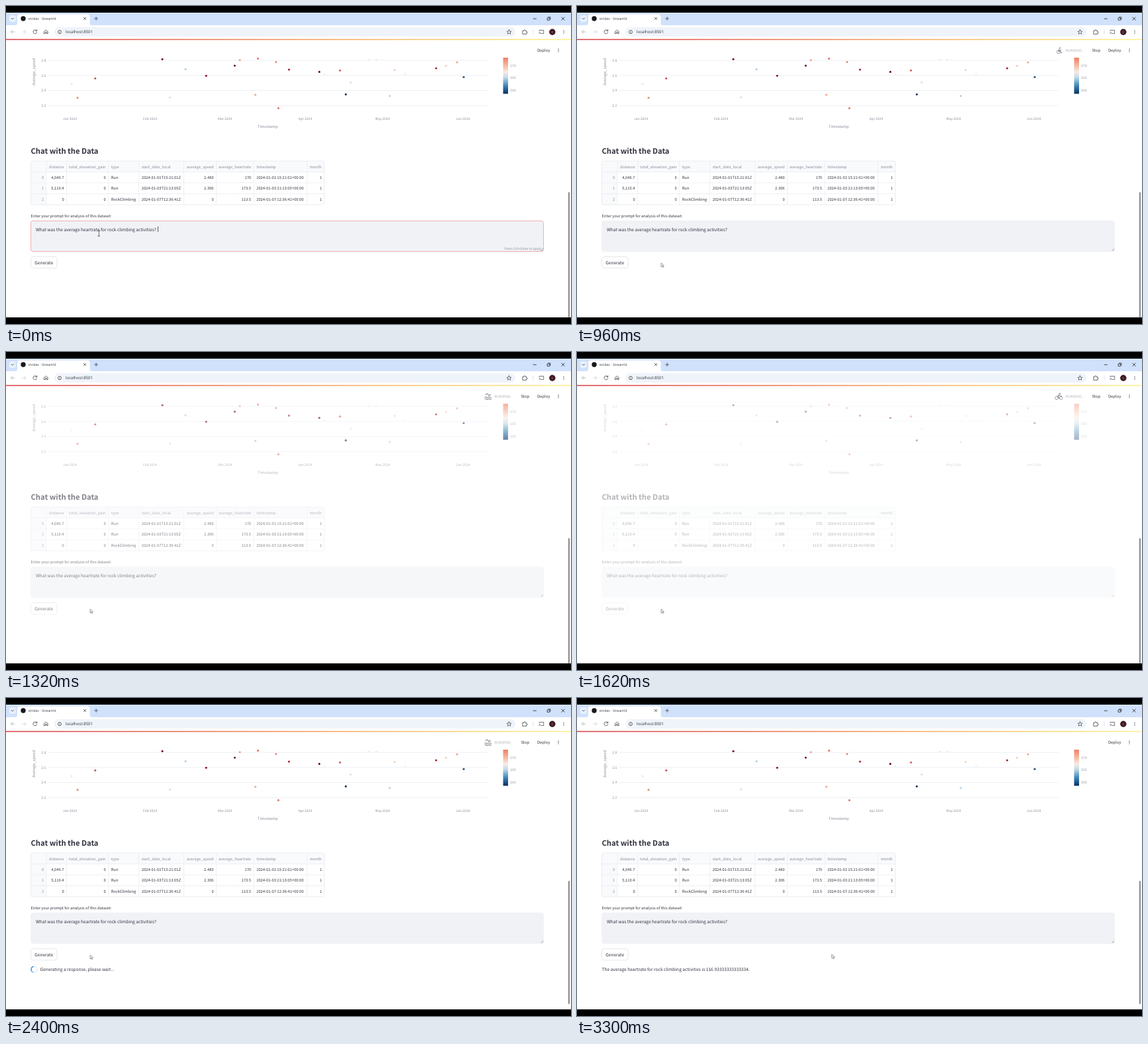
An HTML page for the animation above (3.36 s loop, 853 by 480 pixels).

```html
<!DOCTYPE html>
<html lang="en">
<head>
<meta charset="utf-8">
<title>strides</title>
<style>
html, body { margin: 0; width: 100%; height: 100%; overflow: hidden; background: #000; }
svg { display: block; width: 100vw; height: 100vh; }
text { font-family: "Noto Sans CJK JP", "Noto Sans CJK SC", "Noto Sans CJK", "Noto Sans", sans-serif; text-rendering: geometricPrecision; white-space: pre; }
.ui { font-family: "Open Sans", "Noto Sans", sans-serif; }
.line { fill: none; stroke-linecap: round; stroke-linejoin: round; }
</style>
</head>
<body>
<svg id="stage" viewBox="0 0 853 480"></svg>
<script>
const INK = '#31333f', GREY = '#8a8d99', LOOP = 3360, STEP = 60;

// y is the middle of the capitals
const text = (s, x, y, size, fill = INK, more = '') =>
  `<text x="${x}" y="${y + size * .36}" font-size="${size}" fill="${fill}" ${more}>${s}</text>`;
const END = 'text-anchor="end"', MID = 'text-anchor="middle"', UI = 'class="ui"';
const rect = (x, y, w, h, fill, more = '') =>
  `<rect x="${x}" y="${y}" width="${w}" height="${h}" fill="${fill}" ${more}/>`;
const dot = (x, y, r, fill, more = '') => `<circle cx="${x}" cy="${y}" r="${r}" fill="${fill}" ${more}/>`;
const line = (d, stroke = '#3c4043', w = .8, more = '') =>
  `<path class="line" d="${d}" stroke="${stroke}" stroke-width="${w}" ${more}/>`;
const group = (id, body) => `<g id="${id}">${body}</g>`;
const dots = (x, y, gap, r) => [-gap, 0, gap].map(d => dot(x, y + d, r, '#45474f')).join('');

function gradient(id, axis, stops) {
  const s = stops.map(([o, c]) => `<stop offset="${o}" stop-color="${c}"/>`).join('');
  return `<linearGradient id="${id}" x1="0" y1="0" ${axis}="1" ${axis === 'x2' ? 'y2' : 'x2'}="0">${s}</linearGradient>`;
}

function browser() {
  return rect(0, 10, 853, 460, '#fff') + rect(0, 10, 853, 19, '#d0e1fc') +
    rect(5, 14, 9.5, 10, '#e9f1fe', 'rx="3"') + line('M8 18.3l1.8 1.8 1.8-1.8') +
    '<path d="M14 29q3 0 3-3V16q0-3.5 3.500-3.500H123q3.500 0 3.500 3.500V26q0 3 3 3Z" fill="#fff"/>' +
    dot(26, 19, 3.7, '#17191f') + text('strides · Streamlit', 33.5, 19.3, 5.2, '#3a3c42', UI) +
    line('M117.300 17.200l3.400 3.400m0-3.400l-3.400 3.400M133.700 19h4.800M136.100 16.600v4.800') +
    line('M796 19.200h4.500M838.800 16.900l4.400 4.400m0-4.400l-4.400 4.400M817.500 18h3.200v3.300h-3.200zM818.500 16.800h3.300v3.400', '#222') +
    line('M13 39H7.500m2.500-2.500L7.500 39l2.500 2.500', '#a9adb3') +
    line('M24.500 39H30m-2.500-2.500L30 39l-2.500 2.500', '#cdd0d5') +
    line('M46.300 37.200a2.900 2.900 0 1 0 .4 2.600M46.700 35.800v1.900h-1.900') +
    line('M57.700 38.500l2.700-2.200 2.700 2.200v3.200h-1.800v-2.200h-1.800v2.200h-1.800z') +
    rect(73, 32, 696, 14, '#eff4fb', 'rx="7"') + dot(81, 39.2, 4.8, '#fff') +
    dot(81, 39.2, 2.7, 'none', 'stroke="#3c4043" stroke-width=".8"') +
    line('M81 39v1.500M81 37.700v.1') + text('localhost:8501', 90, 39.3, 6.1, '#2c2f34', UI) +
    line('M759.500 35.800l1 2.300 2.500.2-1.900 1.600.6 2.400-2.200-1.300-2.200 1.300.6-2.400-1.900-1.600 2.500-.2z', '#3c4043', .7) +
    line('M780.300 37.300h1.700q0-1.500 1-1.500t1 1.500h1.700v1.600q1.500 0 1.500 1t-1.500 1v1.500h-5.400z') +
    line('M796 36v6', '#c9dafa') + line('M805 37.500v-1h6.700v5h-3.200M805 39.500q2 0 2.300 2.200M805 41.300v.3', '#3c4043', .7) +
    dot(824.8, 39.2, 4.7, '#3f1a22') + text('C', 824.8, 39.2, 4.3, '#d9a6ae', MID) + dots(842, 39.2, 2.1, .65) +
    rect(0, 49.800, 853, 1.500, 'url(#strip)') +
    text('Deploy', 802, 67, 5.9) + dots(834, 67, 2.1, .7);
}

function chart() {
  const points = [
    [99, 118, '#e2e8ee'], [108, 138.500, '#e28c78'], [134.700, 109.200, '#c9504c'], [236, 80.300, '#780d24'],
    [247.600, 138, '#f6d6c0'], [271, 95.500, '#a9cfe2'], [302.200, 105.200, '#8c1028'], [345.300, 90, '#5f0b20'],
    [353, 81.800, '#efa284'], [376.500, 134, '#efa888'], [380.400, 79.400, '#e67a6c'], [407.700, 84.500, '#e98b7a'],
    [411.200, 154.300, '#e27464'], [427.200, 96, '#a31f2e'], [473, 99.400, '#720c22'], [481, 103, '#f2f1ef'],
    [504.200, 97.200, '#d35c5c'], [513, 133.400, '#17365f'], [520.300, 115.600, '#d8e2ea'], [548, 81, '#f8e7da'],
    [559, 81, '#f8e9de'], [579.300, 135.800, '#b3d2e4'], [586.800, 96.500, '#f4d2c2'], [602.500, 102, '#f3f2f1'],
    [649.400, 94, '#a11f32'], [664.300, 90.200, '#f4cdb6'], [681, 85, '#efa587'], [691, 107.200, '#23507f']];
  let s = '';
  ['2.8', '2.6', '2.4', '2.2'].forEach((v, i) => {
    const y = 82 + i * 22.8;
    s += rect(64, y - .3, 663, .7, '#e4e8f1') + text(v, 60.3, y, 5.05, GREY, END);
  });
  [['Jan', 96.500], ['Feb', 217.500], ['Mar', 330.500], ['Apr', 451.700], ['May', 568.500], ['Jun', 689.700]].forEach(([m, x]) =>
    s += text(m + ' 2024', x, 170, 5.05, GREY, MID));
  s += text('Timestamp', 395.3, 181.5, 5.8, GREY, MID) +
    `<g transform="translate(41.500 99.500) rotate(-90)">${text('Average_speed', 0, 0, 5.8, GREY, MID)}</g>`;
  points.forEach(([x, y, c]) => s += dot(x, y, 1.55, c));
  s += rect(750.5, 78, 7.5, 54.5, 'url(#scale)');
  [170, 165, 160].forEach((v, i) => s += text(v, 761.3, 90 + i * 18.6, 5.05, GREY));
  return s;
}

function table() {
  const edges = [37.5, 61, 91.5, 154.5, 200.5, 268.5, 317.5, 374, 454.5, 480.5];
  const rightCols = [0, 1, 2, 5, 6, 8];
  const rows = [
    ['', 'distance', 'total_elevation_gain', 'type', 'start_date_local', 'average_speed', 'average_heartrate', 'timestamp', 'month'],
    ['0', '4,046.7', '0', 'Run', '2024-01-01T15:21:01Z', '2.483', '170', '2024-01-01 15:21:01+00:00', '1'],
    ['1', '5,110.4', '0', 'Run', '2024-01-03T21:13:05Z', '2.306', '173.5', '2024-01-03 21:13:05+00:00', '1'],
    ['2', '0', '0', 'RockClimbing', '2024-01-07T12:36:41Z', '0', '113.5', '2024-01-07 12:36:41+00:00', '1']];
  let s = rect(37.5, 234, 443, 16.4, '#f9fafc') + rect(37.5, 234, 23.5, 66, '#f9fafc');
  edges.slice(1, -1).forEach(x => s += rect(x - .3, 234, .7, 66, '#e8eaef'));
  [250.4, 266.9, 283.4].forEach(y => s += rect(37.5, y - .3, 443, .7, '#e8eaef'));
  s += rect(37.5, 234, 443, 66, 'none', 'rx="2.5" stroke="#e4e6eb" stroke-width=".7"');
  rows.forEach((row, r) => row.forEach((v, c) => {
    const right = rightCols.includes(c);
    s += text(v, right ? edges[c + 1] - 3.9 : edges[c] + 4.2, 242.5 + r * 16.4, 5.8,
      r && c ? INK : GREY, right ? END : '');
  }));
  return s;
}

function form() {
  return text('Enter your prompt for analysis of this dataset:', 37.5, 316.7, 5.78) +
    rect(37.5, 324.3, 774, 46.2, '#f0f2f6', 'id="area" rx="3.5" stroke-width=".8"') +
    text('What was the average heartrate for rock climbing activities?', 45, 337.2, 6.6) +
    line('M807.500 369.500l3.200-3.200M809.500 369.700l1.300-1.300', '#85878f', .6) +
    group('focus', rect(229, 332.8, .8, 8.2, INK) + text('Press Ctrl+Enter to apply', 808.5, 366.6, 4.9, '#8e9099', END)) +
    rect(37.5, 378.5, 39.5, 17.2, '#fff', 'id="button" rx="3.500" stroke-width=".8"') +
    text('Generate', 57.2, 387.2, 6.6, INK, MID + ' id="caption"');
}

const head = (x, y) => dot(x, y, 1.1, '#85878f');
const ring = (x, y, r) => dot(x, y, r, 'none', 'stroke="#85878f" stroke-width=".8"');
const limbs = d => line(d, '#85878f', 1.1);
const poses = [
  head(729, 63.5) + limbs('M728 65.500l-1 3h3l1.500 2.500M727.800 66.500l3 .3') + ring(727, 69.3, 2.6),
  head(730.5, 64.8) + limbs('M724 64l3-1 2 3M723 68.300q1.300-1 2.500 0t2.500 0 2.500 0 2 0M723 71q1.300-1 2.500 0t2.500 0 2.500 0 2 0'),
  head(729, 62.8) + limbs('M728 64.500l-2.500 2.500 2.200 1.500v2M728 64.500l1.500 2h2') + ring(724, 69.5, 2.2) + ring(730.8, 69.5, 2.2),
  head(727, 62.8) + limbs('M723.500 65.200h7M727 65v3.500M726.200 65.500v6M727.800 65.500v6')
];

const cursors =
  group('ibeam', line('M-1.500-4q1.500 0 1.500 1 0-1 1.500-1M0-3.500v7.500M-1.500 4.500q1.500 0 1.500-1 0 1 1.500 1', '#333', .7)) +
  group('arrow', '<path d="M0 0v5.800l1.400-1.300 1 2.100 1.100-.5-1-2.100h1.900z" fill="#fff" stroke="#555" stroke-width=".6"/>') +
  group('hand', '<path d="M-.6 4V.4q.7-.8 1.400 0V3l2.800.6q.8.3.6 1.200L3.600 7.500H0L-2 4.800q.4-.9 1.400-.8z" fill="#fff" stroke="#333" stroke-width=".6"/>');

const stage = document.getElementById('stage');
stage.innerHTML = '<defs>' +
  gradient('strip', 'x2', [[0, '#d93a3f'], [.3, '#e8694f'], [.65, '#f6b367'], [1, '#fff08a']]) +
  gradient('scale', 'y2', [[0, '#ee7f66'], [.2, '#f6b499'], [.4, '#f6ebe5'], [.55, '#bfd9e8'], [.75, '#4a90bd'], [.9, '#1d568c'], [1, '#0b2e57']]) +
  '</defs>' + browser() +
  group('page', chart() + text('Chat with the Data', 37.5, 219, 11.2, INK, 'font-weight="600"') + table() + form()) +
  group('running', poses.map((p, i) => group('pose' + i, p)).join('') +
    text('RUNNING...', 737, 67, 5.4, '#b4b6be', 'font-style="italic"') + text('Stop', 777.5, 67, 5.9)) +
  group('waiting', dot(42.5, 409.7, 4.5, 'none', 'stroke="#dfe2e8" stroke-width="1.100"') +
    line('M42.500 405.200a4.500 4.500 0 0 1 3.200 7.700', '#1c83e1', 1.1, 'id="arc"') +
    text('Generating a response, please wait...', 51.5, 409.7, 6.6)) +
  group('answer', text('The average heartrate for rock climbing activities is 116.93333333333334.', 37.5, 409.7, 6.6)) +
  rect(848.8, 281, 2.2, 189, '#8c8d92', 'id="thumb" rx="1"') + group('cursor', cursors);

const $ = id => document.getElementById(id);
const set = (id, name, v) => $(id).setAttribute(name, v);
const show = (id, on) => set(id, 'visibility', on ? 'inherit' : 'hidden');
const clamp = v => Math.max(0, Math.min(1, v));
const ease = v => v * v * (3 - 2 * v);

// time, x, y of the pointer
const path = [[60, 140.3, 343], [480, 62, 386], [600, 62, 386], [900, 127, 388], [2940, 127, 388], [3300, 384.7, 387]];
function pointer(t) {
  let [, x, y] = path[0];
  for (let i = 1; i < path.length; i++) {
    const [a, ax, ay] = path[i - 1], [b, bx, by] = path[i];
    if (t > a) {
      const k = ease(clamp((t - a) / (b - a)));
      x = ax + (bx - ax) * k;
      y = ay + (by - ay) * k;
    }
  }
  return [x, y];
}

function draw(t) {
  const clicked = t >= 540, busy = t >= 660 && t < 2760, rerun = t >= 1740, done = t >= 2760;
  set('page', 'opacity', rerun ? 1 : 1 - .64 * clamp((t - 990) / 540));
  show('focus', !clicked);
  set('area', 'stroke', clicked ? '#f0f2f6' : '#ee9c9c');
  show('running', busy);
  const pose = Math.floor((t - 840) / 300) & 3;
  poses.forEach((_, i) => show('pose' + i, busy && i === pose));
  show('waiting', rerun && !done);
  set('arc', 'transform', `rotate(${(t - 1980) * .5} 42.5 409.7)`);
  show('answer', done);
  set('thumb', 'y', rerun ? 276 : 281);
  set('thumb', 'height', rerun ? 186 : 189);

  const [x, y] = pointer(t);
  const hover = x < 77 && y > 378, typing = y < 370;
  set('cursor', 'transform', `translate(${x} ${y})`);
  show('ibeam', typing);
  show('hand', hover);
  show('arrow', !typing && !hover);
  set('button', 'stroke', hover ? '#ff4b4b' : '#e0e1e6');
  set('caption', 'fill', hover ? '#ff4b4b' : INK);
}

const start = performance.now();
function tick() {
  const t = (performance.now() - start) % LOOP;
  draw(Math.floor(t / STEP) * STEP);
  requestAnimationFrame(tick);
}
draw(0);
requestAnimationFrame(tick);
</script>
</body>
</html>
```
